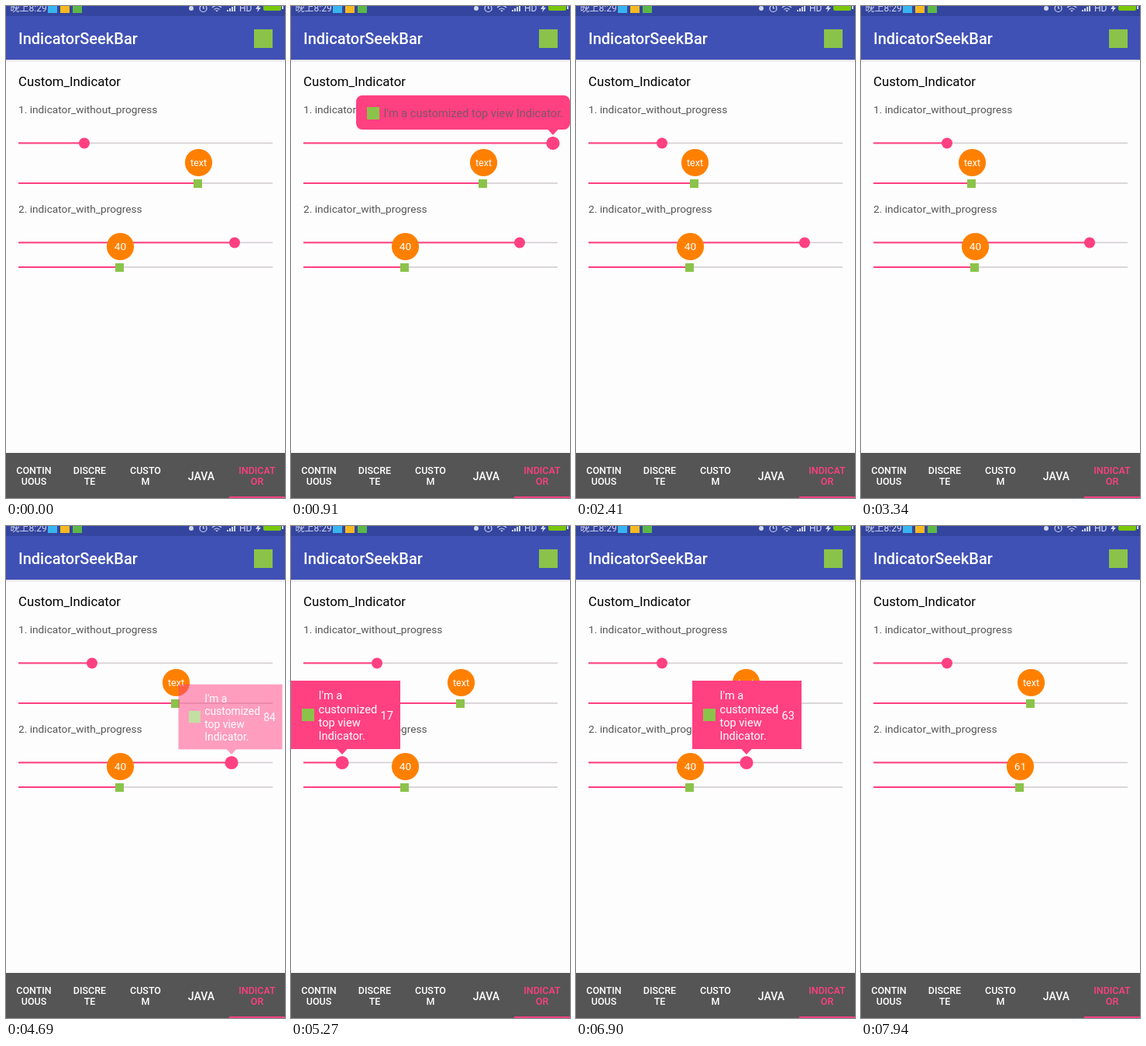
These frames come from a looping animation (360x633 px, 8 s). An HTML page:

```html
<!DOCTYPE html>
<html lang="en">
<head>
<meta charset="utf-8">
<title>IndicatorSeekBar</title>
<style>
  html, body { margin: 0; width: 100%; height: 100%; overflow: hidden; background: #fefdfe; }
  svg { display: block; width: 100%; height: 100%; font-family: Roboto, sans-serif; }
  .mid { text-anchor: middle; }
  .label { font-size: 13.7px; fill: #555; }
  .tab { font-size: 12.5px; font-weight: 500; fill: #fff; text-anchor: middle; }
  .tab.single { font-size: 14px; }
  .tab.active, .accent { fill: #ff4081; }
  .popup { font-size: 14.6px; }
  .green { fill: #8bc34a; }
</style>
</head>
<body>
<svg viewBox="0 0 360 633">
  <rect width="360" height="633" fill="#fefdfe"/>
  <rect y="69" width="360" height="1" fill="#d6d6dc"/>
  <rect y="70" width="360" height="2" fill="#f1f0f4"/>
  <rect width="360" height="69" fill="#3f51b5"/>
  <rect width="360" height="13" fill="#34459f"/>

  <g fill="#d3d8ee" font-size="12">
    <text x="5.500" y="7" style="font-family:Roboto,'Noto Sans CJK SC','Noto Sans CJK',sans-serif">晚上8:29</text>
    <rect x="54" y="-3" width="12" height="12" fill="#38b5f0"/>
    <rect x="70" y="-3" width="12" height="12" fill="#f5b921"/>
    <rect x="86" y="-3" width="12" height="12" fill="#5cb848"/>
    <circle cx="239" cy="3" r="3"/>
    <g fill="none" stroke="#d3d8ee" stroke-width="1.2">
      <circle cx="254.500" cy="3" r="4.500"/>
      <path d="M254.500 0v3h2M266 2q6-5 12 0M268.500 4.500q3.500-3 7 0"/>
    </g>
    <path d="M270 5.500h4l-2 2zM285 5h2v2h-2zM288 3h2v4h-2zM291 1h2v6h-2zM294 0h2v7h-2z"/>
    <text x="301" y="7">HD</text>
    <path d="M326 -2l-4 6h3l-1 4 5-6h-3l2-4z"/>
    <rect x="332" y="-4" width="23" height="10" rx="2" fill="#7ac70c"/>
    <rect x="356" y="0" width="2" height="4"/>
  </g>

  <text x="16" y="49" font-size="20" font-weight="500" fill="#fff">IndicatorSeekBar</text>
  <rect class="green" x="320" y="30" width="24" height="24"/>

  <text x="16" y="103" font-size="16.8">Custom_Indicator</text>
  <text class="label" x="16" y="138">1. indicator_without_progress</text>
  <text class="label" x="16" y="266">2. indicator_with_progress</text>

  <g id="bars"></g>
  <rect y="575" width="360" height="58" fill="#555"/>
  <g id="tabs"></g>
  <rect class="accent" x="288" y="631" width="72" height="2"/>

  <g id="widePopup" class="popup">
    <g class="body">
      <rect class="accent" y="115" width="276" height="44" rx="8"/>
      <rect class="green" x="14" y="130" width="16" height="16"/>
      <text x="35.500" y="143" fill="#7d5566">I'm a customized top view Indicator.</text>
    </g>
    <path class="arrow accent" d="M-7 158.500h14l-7 7.500z"/>
  </g>
  <g id="tallPopup" class="popup">
    <g class="body" fill="#fff">
      <rect class="accent" y="199" width="141" height="88"/>
      <rect class="green" x="14" y="235" width="16" height="16"/>
      <text x="35.500" y="223">I'm a</text>
      <text x="35.500" y="240.500">customized</text>
      <text x="35.500" y="258">top view</text>
      <text x="35.500" y="275">Indicator.</text>
      <text class="value" x="115.500" y="249"></text>
    </g>
    <path class="arrow accent" d="M-7 286.500h14l-7 7.500z"/>
  </g>
</svg>
<script>
const LOOP = 8000, LEFT = 16, RIGHT = 344, WIDTH = 360;
const find = selector => document.querySelector(selector);
const clamp = (value, low, high) => Math.max(low, Math.min(high, value));

// Each drag: resting x, touch time, touch x, then the turning points as [time, x].
const sliders = [
  { y: 176, rest: 101, touch: 170, turns: [[410, 117], [900, 338], [1700, 25], [2030, 111]] },
  { y: 228, rest: 248, touch: 2410, turns: [[2580, 153], [3045, 29], [3760, 341], [4320, 219]] },
  { y: 304, rest: 295, touch: 4530, turns: [[4690, 291], [5480, 22], [6480, 338], [6980, 212]] },
  { y: 336, rest: 147, touch: 7120, turns: [[7120, 147], [7400, 341], [7720, 341], [8092, 130]] }
];

// A finger swings back and forth: sine easing between turning points.
function position({ rest, touch, turns }, t) {
  if (t < touch) return rest;
  const next = turns.findIndex(([time]) => time > t);
  if (next === 0) return turns[0][1];
  if (next < 0) return turns[turns.length - 1][1];
  const [t0, from] = turns[next - 1], [t1, to] = turns[next];
  return from + (to - from) * (1 - Math.cos(Math.PI * (t - t0) / (t1 - t0))) / 2;
}

// The printed number trails the thumb slightly.
const percent = (slider, t) =>
  Math.round((position(slider, t - 13) - LEFT) / (RIGHT - LEFT) * 100);

const fade = (t, start, end) => clamp(Math.min(t - start, end - t) / 200, 0, 1);

function buildSlider({ y }, i) {
  const bubble = i % 2 === 1;
  const lineY = bubble ? y : y + .4;
  const thumb = bubble
    ? `<circle cx=".5" cy="${y - 26.5}" r="17.6" fill="#ff8000"/>
       <rect class="green" x="-6" y="${y - 5}" width="11" height="11"/>
       <text class="mid" x=".5" y="${y - 22}" font-size="${i === 1 ? 12.5 : 13.7}" fill="#fff">text</text>`
    : `<circle class="accent knob" cy="${y + .5}" r="7"/>`;
  const group = document.createElementNS("http://www.w3.org/2000/svg", "g");
  group.innerHTML =
    `<rect x="${LEFT}" y="${lineY - .8}" width="${RIGHT - LEFT}" height="1.6" fill="#d2ced2"/>
     <rect class="accent progress" x="${LEFT}" y="${lineY - 1}" height="2"/>
     <g class="thumb">${thumb}</g>`;
  find("#bars").append(group);
  return group;
}
const bars = sliders.map(buildSlider);

const tabs = ["CONTIN UOUS", "DISCRE TE", "CUSTO M", "JAVA", "INDICAT OR"];
find("#tabs").innerHTML = tabs.map((name, i) => {
  const lines = name.split(" "), single = lines.length === 1;
  const kind = (single ? " single" : "") + (i === tabs.length - 1 ? " active" : "");
  return lines.map((line, row) =>
    `<text class="tab${kind}" x="${36 + i * 72}" y="${single ? 609.5 : 602 + row * 14.3}">${line}</text>`
  ).join("");
}).join("");

function placePopup(id, x, width, tipY, shown) {
  const left = Math.round(clamp(x - width / 2, 0, WIDTH - width));
  const center = left + width / 2, scale = .9 + .1 * shown;
  const popup = find(id);
  popup.setAttribute("opacity", shown);
  popup.setAttribute("transform",
    `translate(${center} ${tipY}) scale(${scale}) translate(${-center} ${-tipY})`);
  popup.querySelector(".body").setAttribute("transform", `translate(${left})`);
  popup.querySelector(".arrow").setAttribute("transform", `translate(${x})`);
}

function draw(t) {
  const xs = sliders.map(slider => Math.round(position(slider, t)));
  bars.forEach((bar, i) => {
    const { touch, turns } = sliders[i];
    const pressed = t >= touch && t < turns[turns.length - 1][0];
    bar.querySelector(".progress").setAttribute("width", xs[i] - LEFT);
    bar.querySelector(".thumb").setAttribute("transform", `translate(${xs[i]})`);
    bar.querySelector(".knob")?.setAttribute("r", pressed ? 8.6 : 7);
  });
  bars[3].querySelector("text").textContent = percent(sliders[3], t);
  find(".value").textContent = percent(sliders[2], t);
  placePopup("#widePopup", xs[0], 276, 166, fade(t, 340, 2190));
  placePopup("#tallPopup", xs[2], 141, 294, fade(t, 4590, 7140));
}

const began = performance.now();
function tick() {
  draw((performance.now() - began) % LOOP);
  requestAnimationFrame(tick);
}
tick();
</script>
</body>
</html>
```
